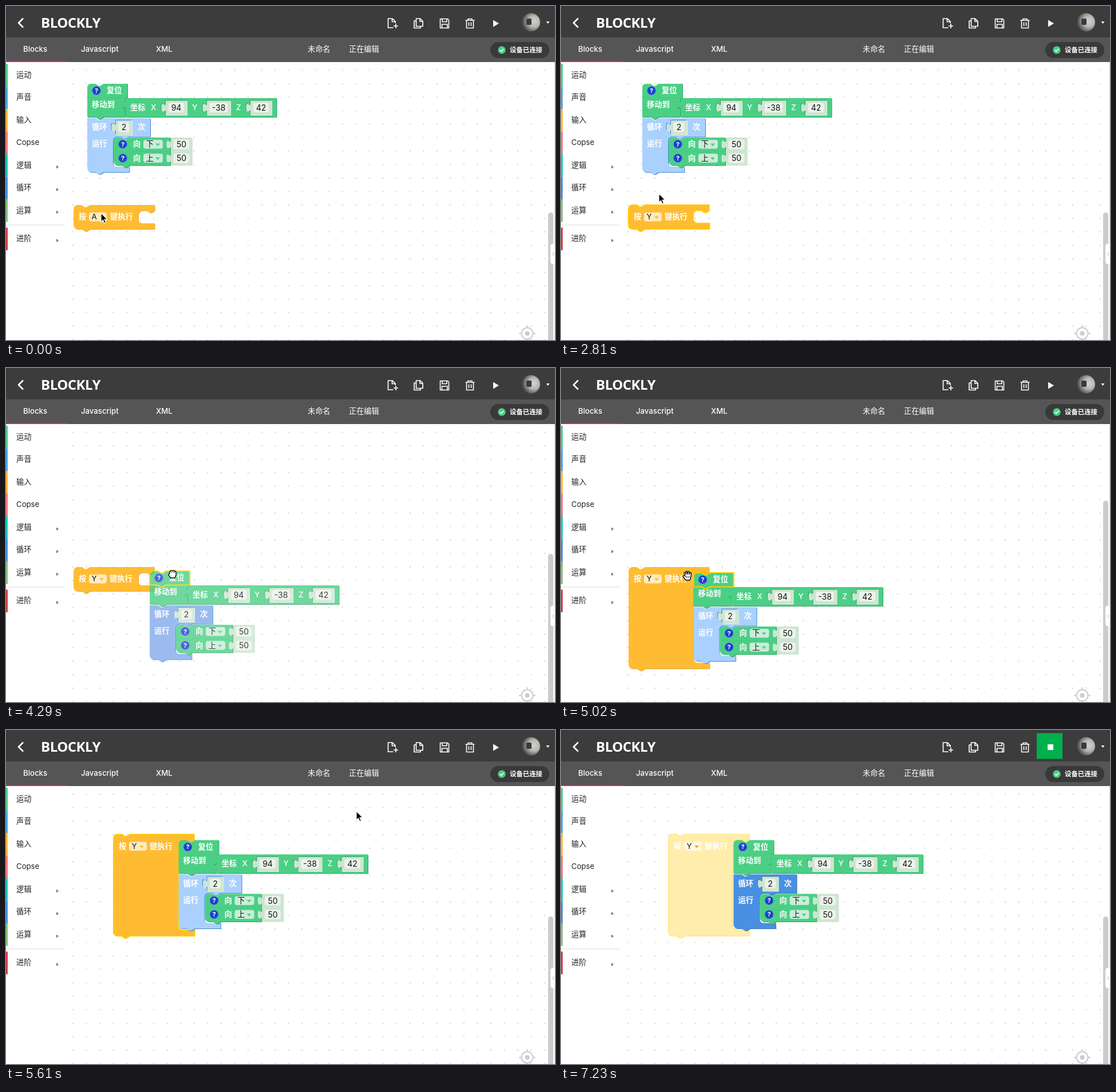
Animation of 959 by 584 pixels, one loop 8.28 s. Source, as an HTML page:

```html
<!DOCTYPE html>
<html lang="zh-CN">
<meta charset="utf-8">
<title>Blockly</title>
<style>
  html, body { margin: 0; width: 100%; height: 100%; overflow: hidden; background: #fff }
  svg { display: block; font-family: Inter, "Noto Sans CJK SC", "Noto Sans CJK", sans-serif }
</style>
<svg id="stage" width="959" height="584" viewBox="0 0 959 584"></svg>
<script>
const stage = document.getElementById('stage');
const GREEN = '#4bcf85', GREEN_EDGE = '#35a065', BLUE = '#4a90e2';
const LOOP = 8280, STEP = 147.75, LAST = 49;

// basic shapes; text is placed by its vertical centre
const text = (x, cy, s, size = 13.3, fill = '#fff', extra = '') =>
  `<text x="${x}" y="${cy + size * .36}" font-size="${size}" fill="${fill}" ${extra}>${s}</text>`;
const mid = 'text-anchor="middle"', medium = 'font-weight="500"', bold = 'font-weight="600"';
const label = (x, cy, s) => text(x, cy, s, 13.3, '#fff', /[A-Z]/.test(s) ? medium : bold);
const rect = (x, y, w, h, fill, r = 0) =>
  `<rect x="${x}" y="${y}" width="${w}" height="${h}" rx="${r}" fill="${fill}"/>`;
const path = (d, fill, extra = '') => `<path d="${d}" fill="${fill}" ${extra}/>`;
const line = (d, color, w) =>
  path(d, 'none', `stroke="${color}" stroke-width="${w}" stroke-linejoin="round"`);
const circle = (x, y, r, fill, extra = '') =>
  `<circle cx="${x}" cy="${y}" r="${r}" fill="${fill}" ${extra}/>`;
const group = (x, y, s, extra = '') => `<g transform="translate(${x} ${y})" ${extra}>${s}</g>`;

// keys are [step, ...values]; linear in between
function track(keys, n) {
  if (n <= keys[0][0]) return keys[0].slice(1);
  for (let i = 1; i < keys.length; i++) {
    const a = keys[i - 1], b = keys[i];
    if (n <= b[0]) {
      const k = (n - a[0]) / (b[0] - a[0]);
      return a.slice(1).map((v, j) => v + (b[j + 1] - v) * k);
    }
  }
  return keys[keys.length - 1].slice(1);
}

// block outlines
const TAB = 'l-5.7 3.8h-2.8l-5.7-3.8';
function body(x, y, w, h, top, bottom, mouth = '') {
  return `M${x} ${y + top}a${top} ${top} 0 0 1 ${top} ${-top}H${x + 14.2}l5.7 3.8h2.8l5.7-3.8` +
    `H${x + w}${mouth}V${y + h}H${x + 28.4}${TAB}H${x + bottom}` +
    `a${bottom} ${bottom} 0 0 1 ${-bottom} ${-bottom}z`;
}
const mouth = (x, top, bottom) =>
  `V${top}H${x + 28.4}${TAB}H${x + 7}a7 7 0 0 0-7 7V${bottom - 7}a7 7 0 0 0 7 7H${x + 28.4}`;
const plug = (x, y, w, h) =>
  `M${x} ${y}v4.7c0 9.4-7.6-7.6-7.6 7.1s7.6-2.4 7.6 7.1V${y + h}h${w}v${-h}z`;

function block(d, fill, edge, glow) {
  return glow
    ? path(d, fill, `stroke="${glow}" stroke-width="2.2" stroke-linejoin="round"`)
    : path(d, edge, 'transform="translate(1 1)"') + path(d, fill);
}
const green = (d, glow) => block(d, GREEN, GREEN_EDGE, glow);

// a value; inside a parent block it sits in a bevelled hole
function number(x, y, w, h, s, hole) {
  const d = plug(x, y, w, h);
  return (hole ? path(d, hole, 'transform="translate(-1 -1)"') : '') +
    block(d, '#cde5d0', hole ? '#e2f3e6' : '#d5e8d6') +
    rect(x + 4.5, y + 3.5, w - 9, 17, '#eaf2ea', 4) +
    text(x + w / 2, y + 12, s, 14, '#111', mid);
}
function help(x, y) {
  return circle(x, y, 7.3, '#1c3fd0', 'stroke="#4a72dd" stroke-width="1"') +
    text(x, y, '?', 11, '#fff', mid + ' font-weight="700"');
}
function dropdown(x, y, w, s, fill, arrow) {
  return rect(x, y, w, 15.5, fill, 4) + text(x + 4.5, y + 7.7, s, 13.3, '#111') +
    path(`M${x + w - 13} ${y + 6.5}h8l-4 4.5z`, arrow);
}
function move(y, s) {
  return green(body(188, y, 99, 24.3, y < 240 ? 7 : 0, y < 240 ? 0 : 7)) +
    help(204, y + 11.7) + label(222, y + 11.5, '向') +
    dropdown(240, y + 4, 34, s, '#cbecd9', GREEN) + number(288, y, 37, 24, 50);
}

function program(n, selected, dragging) {
  const running = n >= 43;
  const loop = running ? BLUE : dragging ? '#82abeb' : '#aad1fd';
  const edge = running ? '#3b73b5' : '#3f86dd';
  const reset = green(body(142, 136, 70, 24.5, 6, 0), selected && '#fc0') +
    help(158, 148) + label(176, 147.5, '复位');
  return (selected ? '' : reset) +
    green(body(142, 160.5, 66, 33.5, 0, 0)) + label(150, 172, '移动到') +
    green(plug(209, 161, 263.5, 33)) + label(217, 177, '坐标') +
    label(253, 177, 'X') + number(279, 165.5, 37, 25, 94, GREEN_EDGE) +
    label(325, 177, 'Y') + number(351, 165.5, 41, 25, -38, GREEN_EDGE) +
    label(402, 177, 'Z') + number(427, 165.5, 37, 25, 42, GREEN_EDGE) +
    block(body(142, 196, 110, 94.5, 0, 7, mouth(187, 228.5, 281)), loop, edge) +
    label(150, 211.5, '循环') + number(192, 200, 28, 25, 2, edge) + label(230, 211.5, '次') +
    label(150, 240.5, '运行') + move(230, '下') + move(254.3, '上') +
    (selected ? reset : '');
}

function keyBlock(n, selected, joined) {
  const letter = n < 16 ? 'A' : 'Y', w = n < 16 ? 141.5 : 140.5, h = joined ? 177.5 : 42;
  const running = n >= 43;
  return block(body(118, 348, w, h, 7, 7, mouth(231, 357.4, 338 + h)),
      running ? '#ffedae' : '#ffbc33', '#e5a62d', selected && (running ? '#ffe98f' : '#fc0')) +
    label(127, 368.5, '按') +
    dropdown(145, 361, 31, letter, running ? '#fff8df' : '#ffebc2', running ? '#e0a82c' : '#ffbc33') +
    label(w + 40.5, 368.5, '键执行');
}

function header(n) {
  let s = rect(0, 0, 959, 55, '#3c3c3c') + rect(0, 55, 959, 43, '#555') +
    rect(0, 96, 107, 2, '#f0146c') + line('M30 21.5l-8 8 8 8', '#fff', 2.6) +
    text(61, 29, 'BLOCKLY', 24, '#fff',
      'font-family="Open Sans, sans-serif" font-weight="700" letter-spacing="-.5"');
  [[30, 'Blocks'], [131, 'Javascript'], [262, 'XML'], [527, '未命名'], [599, '正在编辑']]
    .forEach(([x, title]) => s += text(x, 75.5, title, 13.2, '#fff', medium));
  s += rect(846, 63, 103, 28, '#393939', 14) + circle(866, 77, 6.7, GREEN) +
    line('M862.8 77l2.4 2.4 4-4.4', '#fff', 1.6) + text(880, 76.5, '设备已连接', 11.4, '#fff', bold);
  if (n >= 41) s += rect(831, 5.5, 45, 45, n < 43 ? '#282828' : n < 45 ? '#009a42' : '#00b04c');
  s += n >= 43 ? rect(850, 25, 10, 10, '#fff') : path('M851 24.5v12l10-6z', '#fff');
  s += line('M680 30v-3l-5-5h-7.5v16h9M674.5 22v5.5h5.5M681 31v8M677 35h8', '#fff', 1.7) +
    line('M716 26h-3v12.5h11v-3M716.5 22h7l4.5 4.5v9h-11.5zM723 22v5h5', '#fff', 1.7) +
    line('M758.5 22.5h13l2 2v14h-15zM762 22.5v5h8v-5M761.5 38v-6h9.5v6', '#fff', 1.6) +
    line('M802.5 25h16M807 25v-2.5h7V25M804.5 25v13.5h12V25M808.5 28.5v6.5M812.5 28.5v6.5', '#fff', 1.6);
  return s + circle(917, 28.5, 16, 'url(#photo)') + rect(909, 22, 9, 11, '#3a3a3a', 2) +
    path('M943.5 27h6l-3 4z', '#fff');
}

function sidebar() {
  const items = [['运动', GREEN], ['声音', '#49a7e9'], ['输入', '#fdba30'], ['Copse', '#f87575'],
    ['逻辑', '#10ccc0'], ['循环', BLUE], ['运算', '#85c27a'], ['进阶', '#d83f3f']];
  return items.map(([name, color], i) => {
    const y = 120.5 + i * 39.5 + (i === 7 ? 10 : 0);
    return rect(0, y - 19.5, 3, 39.5, color) + text(18, y - .5, name, 13.2, '#222') +
      (i > 3 ? path(`M88 ${y}v6l4-3z`, '#777') : '');
  }).join('') + rect(0, 382.5, 103, 1, '#ddd');
}

function menu(n, y) {
  const pitch = 21.62, row = Math.floor((y - 1.2) / pitch);
  let s = rect(121, -4, 155, 592, '#8a8a8a') + rect(122, -4, 153, 592, '#fff');
  if (n > 2) s += rect(122, 1.2 + row * pitch, 153, pitch, '#d1e8f8');
  [...'ABCDEFGHIJKLMNOPQRSTUVWXYZ', 'SPACE'].forEach((c, i) =>
    s += text(148.5, 12 + i * pitch, c, 12.6, '#000', medium));
  return s + line('M131 12.5l2.6 3.5 5-8', '#111', 1.5);
}

const ARROW = 'M0 0V15.5l3.5-3.3 2.4 5.6 2.6-1.1-2.4-5.5h4.9z';
const FIST = 'M-5-1Q-6-5-3.5-5Q-2-7 0-5.5Q2-7 3.5-5Q6-5.5 6-2V2Q5 4 4 7H-4Q-5 4-7 2Q-7-1-5-1z';
const HAND = 'M-4 1L-6-4Q-5-7-3.5-5L-2.5-2-3-6.5Q-1.5-9-.5-6.5L0-2 1-7Q3-8.5 3.2-6L3-2 4.5-5Q7-6 6.5-3Q6 4 4 8H-3Q-5 5-8 2Q-8-1-4 1z';
function cursor(n, x, y) {
  const drag = n >= 27 && n < 32 || n === 35 || n === 36;
  const open = n >= 24 && n < 35;
  return group(x, y, drag || open
    ? path(drag ? FIST : HAND, '#fff', 'stroke="#000" stroke-width="1.3"') +
      line(drag ? 'M-2-5v3M1-5v3M3.5-4.500v2.500' : 'M-2 1v3M1 1v3M3.5 1v2', '#000', .9)
    : path(ARROW, '#000', 'stroke="#fff" stroke-width="1.2"'));
}

const pointer = [[2, 166, 362], [3, 166, 370], [4, 166, 370], [5, 166, 385], [9, 161, 494],
  [11, 161, 514], [12, 161, 514], [13, 161, 524], [15, 161, 528], [16, 162, 505], [17, 165, 450],
  [19, 171, 328], [21, 175, 220], [24, 182, 141], [26, 182, 141], [28, 222, 197], [29, 291, 360],
  [31, 274, 363], [32, 272, 363], [34, 221, 363], [35, 215, 363], [36, 285, 208], [38, 612, 142],
  [40, 810, 52], [41, 853, 31], [44, 853, 31], [45, 800, 80], [48, 431, 427]];
const dragged = [[26, 0, 0], [28, 40, 56], [29, 109, 219], [31, 92, 222], [32, 89.5, 222]];
const lifted = [[35, 0, 0], [36, 70, -155], [37, 70, -165.5]];
const scroll = [[26, 361], [28, 345], [29, 325], [31, 325], [32, 232], [35, 232], [36, 326]];

const DEFS = `<defs><radialGradient id="photo" cx=".66" cy=".45" r=".68">
  <stop stop-color="#d2d2ce"/><stop offset=".45" stop-color="#b5b5b2"/>
  <stop offset="1" stop-color="#3a3a3a"/></radialGradient>
  <pattern id="dots" x="116" y="111.5" width="23.55" height="23.55" patternUnits="userSpaceOnUse">
  <rect width="1.6" height="1.6" fill="#bdbdbd"/></pattern></defs>`;

function draw(n) {
  const [px, py] = track(pointer, n), [gx, gy] = track(dragged, n);
  const [ox, oy] = track(lifted, n), [top] = track(scroll, n);
  const dragging = n >= 27 && n < 32;
  const keySelected = n >= 1 && n < 25 || n >= 35;
  const faded = on => on ? 'opacity=".8"' : '';
  let s = DEFS + rect(0, 0, 959, 584, '#fff') + rect(112, 98, 832, 486, 'url(#dots)') + sidebar();
  s += circle(910.5, 572.5, 10, 'none', 'stroke="#ccc" stroke-width="2"') +
    circle(910.5, 572.5, 4, '#ccc') +
    line('M896 572.5h5M920 572.5h5M910.5 558v5M910.5 582v5', '#ccc', 2);
  s += group(ox, oy,
    group(0, 0, keyBlock(n, keySelected, n >= 32), faded(n === 36)) +
    group(gx, gy, program(n, n >= 25 && n < 35, dragging), faded(dragging || n === 36)));
  s += rect(947, top, 9, 620 - top, '#cbcbcb', 4.5) + rect(958, 98, 1, 486, '#ddd') +
    path('M959 414l-5 2q-3 1-3 4v27q0 3 3 4l5 2z', '#fff', 'stroke="#e4e4e4" stroke-width=".6"') +
    line('M957 431l-2.5 3 2.5 3', '#bbb', 1) + header(n);
  if (n >= 2 && n < 16) s += menu(n, py);
  if (n < LAST) s += cursor(n, px, py);
  stage.innerHTML = s;
}

let shown = -1;
function tick() {
  const t = performance.now() % LOOP;
  const n = Math.min(LAST, Math.floor((t + 10) / STEP));
  if (n !== shown) draw(shown = n);
  requestAnimationFrame(tick);
}
tick();
</script>
</html>
```
